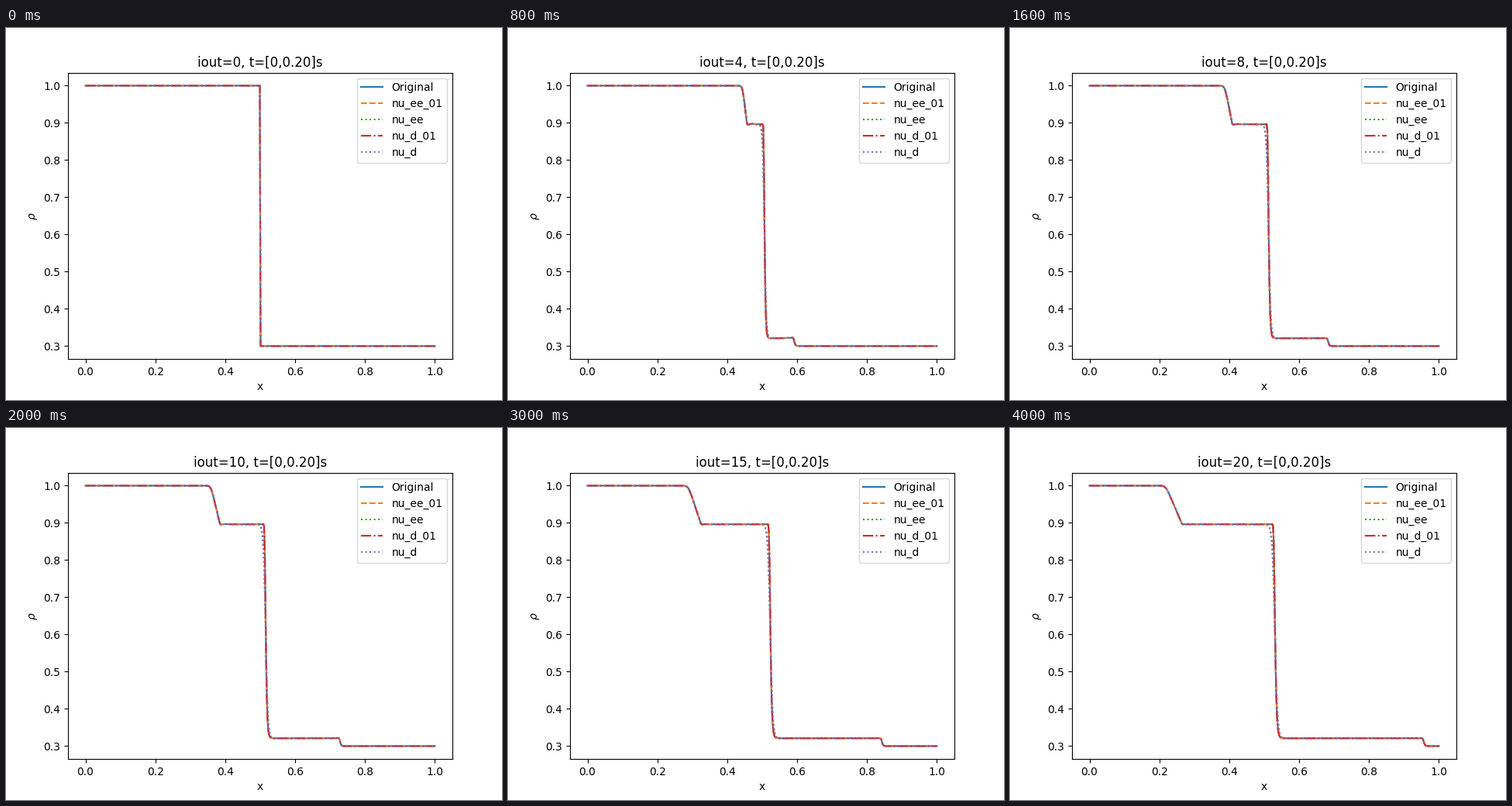
Write a matplotlib script that moves like this. It is 640 px wide and 480 px high and loops after 4.2 s.

```python
import numpy as np
import matplotlib.pyplot as plt
from matplotlib.animation import FuncAnimation

FRAMES, INTERVAL = 21, 200
RHO_L, RHO_R = 1.0, 0.3
STAR_L, STAR_R = 0.8963, 0.321
X = np.linspace(0, 1, 500)

# label, line style, smeared contact
SERIES = [
    ("Original", "-", False),
    ("nu_ee_01", "--", False),
    ("nu_ee", ":", True),
    ("nu_d_01", "-.", False),
    ("nu_d", ":", True),
]


def ramp(x, width):
    """Smooth version of max(x, 0)."""
    return width * np.logaddexp(0, x / width)


def sharp_top_step(z):
    """Falls from 1 to 0 with a hard shoulder and a soft toe."""
    return 1 - np.exp(-np.exp(np.clip(-z, -50, 50)))


def smooth_step(z):
    return 1 / (1 + np.exp(np.clip(z, -50, 50)))


def density(n, smeared):
    """Shock tube profile at time 0.01 * n: fan, contact, shock."""
    if n == 0:
        return np.where(X < 0.5, RHO_L, RHO_R)
    t = 0.01 * n
    early = min(1, 4 / n)

    head, tail = 0.5 - 1.41 * t, 0.5045 - 1.197 * t
    soft = 0.0022 * (n / 4) ** 0.35
    slope = (RHO_L - STAR_L) / (tail - head)
    fan = RHO_L - slope * (ramp(X - head, soft) - ramp(X - tail, 0.0006))
    fan -= 0.002 * early * np.exp(-((X - tail - 0.002) / 0.004) ** 2)
    fan += 0.001 * early * np.exp(-((X - tail - 0.016) / 0.008) ** 2)

    spread = (n / 4) ** 0.25
    if smeared:
        contact = smooth_step((X - 0.5005 - 0.15 * t) / (0.0025 * spread))
    else:
        contact = sharp_top_step((X - 0.5 - 0.15 * t) / (0.002 * spread))

    front = 0.5 + 2.28 * t
    bump = 0.0018 * early * np.exp(-np.abs(X - front) / 0.02)
    shock = sharp_top_step((X - front) / 0.0022)
    right = RHO_R + (STAR_R - RHO_R + bump) * shock
    return right + (fan - right) * contact


fig, ax = plt.subplots(figsize=(6.4, 4.8), dpi=100)
lines = [ax.plot(X, density(0, smeared), style, label=label)[0]
         for label, style, smeared in SERIES]
ax.set(xlim=(-0.05, 1.05), ylim=(0.265, 1.035), xlabel="x", ylabel=r"$\rho$")
ax.legend(loc="upper right")
title = ax.set_title("")


def update(n):
    title.set_text(f"iout={n}, t=[0,0.20]s")
    for line, (_, _, smeared) in zip(lines, SERIES):
        line.set_ydata(density(n, smeared))
    return [*lines, title]


anim = FuncAnimation(fig, update, frames=FRAMES, interval=INTERVAL,
                     repeat=True, repeat_delay=0)
plt.show()
```
